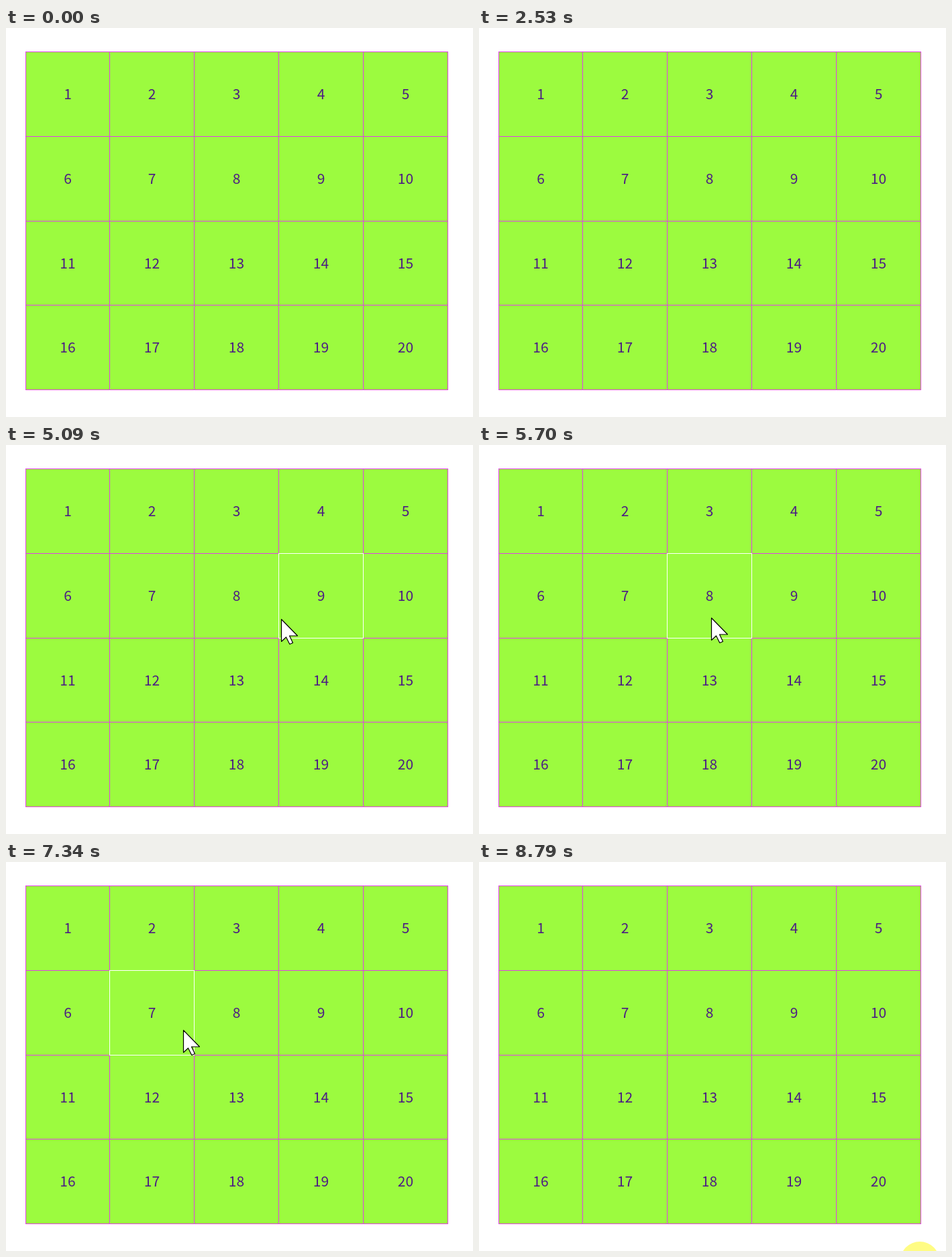
Animation of 696 by 579 pixels, one loop 8.85 s. Source, as an HTML page:

```html
<!DOCTYPE html>
<html>
<head>
<meta charset="utf-8">
<style>
html, body { margin: 0; height: 100%; overflow: hidden; background: #fff; }
svg { display: block; }
text { font: 21px "Noto Sans CJK SC", "Noto Sans CJK JP", "Open Sans", sans-serif; fill: #4b1c84; text-anchor: middle; }
.cursor { fill: #fff; stroke: #000; stroke-width: 1.2; stroke-linejoin: round; }
</style>
</head>
<body>
<svg width="696" height="579" viewBox="0 0 696 579">
  <g id="grid" shape-rendering="crispEdges"></g>
  <g id="hover" shape-rendering="crispEdges"></g>
  <g id="labels"></g>
  <circle id="halo" cx="657" cy="594.3" r="29.3" fill="#fffc84"/>
  <path id="arrow" class="cursor" d="M.5 .5V33.5L7.5 27L12.8 37.5L17.5 35.5L12.5 25H24.5Z"/>
  <path id="hand" class="cursor" d="M-4 4Q-4 0-.5 0Q3 0 3 4V14Q7 10 9 15Q13 11 14.5 17Q19 14 20 20V32Q19 40 14.5 44Q9 46 4 45.5Q-2 45-6 38L-13.5 28Q-13 24.5-9.5 25Q-6 27-4 30ZM3 14V22M9 15V22M14.5 17V22"/>
</svg>
<script>
const LOOP = 8850, STEP = 70, COLS = 5, ROWS = 4, SIZE = 125.85;
const GREEN = '#9cfb3f', PINK = '#e03fe6', WHITE = '#fff';
const OFF = [720, 700];
const lines = (start, n) => Array.from({ length: n + 1 }, (_, i) => Math.floor(start + SIZE * i));
const X = lines(29.1, COLS), Y = lines(35.4, ROWS);

// start, end, waypoints of the cursor; it rests at the last one
const moves = [
  [0, 0, OFF],
  [200, 480, [561, 560], [343, 345]],
  [750, 1030, [342, 330], [343, 218]],
  [1300, 1440, [343, 218], [217, 219]],
  [1700, 2260, [216, 235], [215, 345], [345, 390]],
  [2260, 2260, OFF],
  [4470, 5290, [639, 414], [465, 292], [355, 225]],
  [5360, 6180, [397, 235], [346, 257], [290, 248], [232, 205]],
  [6250, 6730, [230, 190], [224, 137], [327, 140]],
  [6870, 7750, [325, 150], [285, 232], [230, 280], [302, 346]],
  [7820, 8520, [312, 347], [262, 353], [410, 382], [640, 565]],
  [8520, 8520, OFF]
];

const $ = id => document.getElementById(id);
const show = (id, on) => $(id).style.display = on ? '' : 'none';
const rect = (x, y, w, h, fill) => `<rect x="${x}" y="${y}" width="${w}" height="${h}" fill="${fill}"/>`;
const center = (a, i) => (a[i] + a[i + 1] + 1) / 2;
const find = (a, v) => a.findIndex((edge, i) => v >= edge && v < a[i + 1]);
const number = (c, r) => r * COLS + c + 1;

$('grid').innerHTML = rect(29, 35, 630, 504, GREEN) +
  Y.map(y => rect(29, y, 630, 1, PINK)).join('') +
  X.map(x => rect(x, 35, 1, 504, PINK)).join('');

for (let r = 0; r < ROWS; r++)
  for (let c = 0; c < COLS; c++)
    $('labels').innerHTML += `<text x="${center(X, c)}" y="${center(Y, r) + 7.5}">${number(c, r)}</text>`;

function cursorAt(t) {
  const [start, end, ...path] = moves.filter(m => m[0] <= t).pop();
  const last = path.length - 1;
  if (!last) return path[0];
  const steps = Math.round((end - start) / STEP);
  const step = Math.min(steps, Math.floor((t - start) / (end - start) * steps));
  const p = step / steps * last, i = Math.min(last - 1, Math.floor(p));
  return path[i].map((v, k) => v + (path[i + 1][k] - v) * (p - i));
}

// Unless raised, later neighbours cover the right and bottom borders.
function outline(c, r, raised) {
  const x = X[c], y = Y[r], w = X[c + 1] - x, h = Y[r + 1] - y;
  let s = rect(x, y, w, 1, WHITE) + rect(x, y, 1, h, WHITE);
  if (raised || c === COLS - 1) s += rect(x + w, y, 1, h + 1, WHITE);
  if (raised || r === ROWS - 1) s += rect(x, y + h, w + 1, 1, WHITE);
  return s;
}

function draw(t) {
  const [x, y] = cursorAt(t), c = find(X, x), r = find(Y, y);
  const inside = c >= 0 && r >= 0;
  const half = 6 * String(number(c, r)).length;
  const onLink = inside && Math.abs(x - center(X, c)) < half && Math.abs(y - center(Y, r)) < 14;
  $('hover').innerHTML = inside ? outline(c, r, t > 2600) : '';
  for (const id of ['hand', 'arrow'])
    $(id).setAttribute('transform', `translate(${Math.round(x)} ${Math.round(y)})`);
  show('hand', onLink);
  show('arrow', !onLink);
  show('halo', t >= 8790);
}

function tick() {
  draw(performance.now() % LOOP);
  requestAnimationFrame(tick);
}
tick();
</script>
</body>
</html>
```
